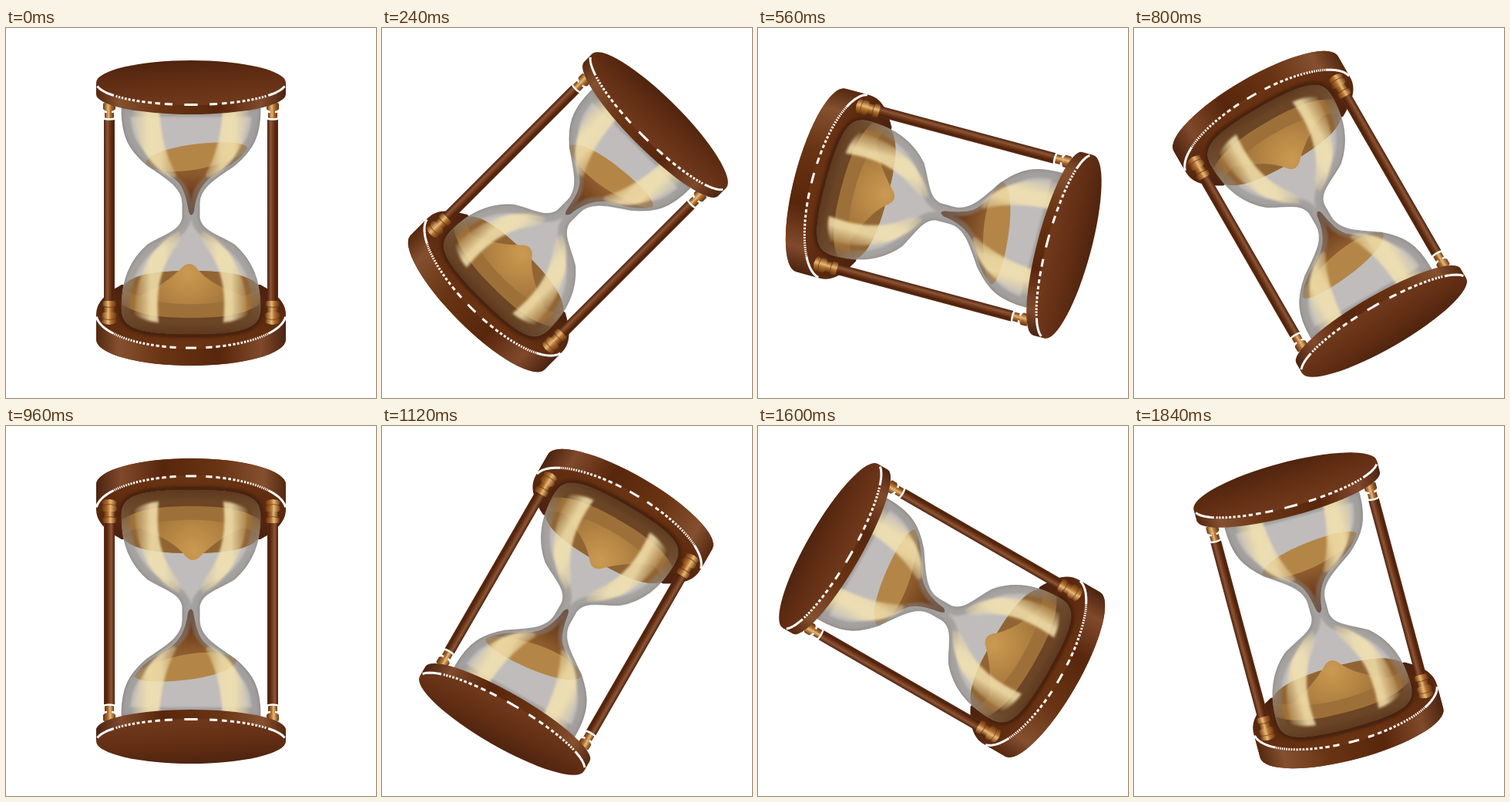
Animation of 480 by 480 pixels, one loop 1.92 s. Source, as an HTML page:

```html
<!DOCTYPE html>
<html lang="en">
<head>
<meta charset="utf-8">
<title>Hourglass</title>
<style>
  html, body { margin: 0; width: 100%; height: 100%; overflow: hidden; background: #fff; }
  svg { display: block; width: 100vw; height: 100vh; }
</style>
</head>
<body>
<svg viewBox="0 0 480 480">
  <defs>
    <linearGradient id="face" x1="0" y1="0" x2=".25" y2="1">
      <stop offset="0" stop-color="#4a210d"/><stop offset=".45" stop-color="#5f2c13"/><stop offset="1" stop-color="#6f381b"/>
    </linearGradient>
    <linearGradient id="rim">
      <stop offset="0" stop-color="#55280f"/><stop offset=".12" stop-color="#84502f"/><stop offset=".35" stop-color="#693413"/>
      <stop offset=".65" stop-color="#58260c"/><stop offset=".87" stop-color="#80492b"/><stop offset="1" stop-color="#4b2310"/>
    </linearGradient>
    <linearGradient id="deck" x1="0" y1="0" x2="0" y2="1">
      <stop offset="0" stop-color="#4a210e"/><stop offset=".5" stop-color="#602c10"/><stop offset="1" stop-color="#733a16"/>
    </linearGradient>
    <linearGradient id="wood">
      <stop offset="0" stop-color="#4b220f"/><stop offset=".32" stop-color="#8d5536"/><stop offset=".55" stop-color="#6f3819"/><stop offset=".8" stop-color="#4f210c"/><stop offset="1" stop-color="#5a2c15"/>
    </linearGradient>
    <linearGradient id="gold">
      <stop offset="0" stop-color="#6b3611"/><stop offset=".42" stop-color="#e8b873"/><stop offset=".62" stop-color="#b06f31"/><stop offset="1" stop-color="#64310f"/>
    </linearGradient>
    <linearGradient id="funnel" x1="0" y1="0" x2="0" y2="1">
      <stop offset="0" stop-color="#a37338"/><stop offset=".4" stop-color="#8a582b"/><stop offset=".75" stop-color="#683617"/><stop offset="1" stop-color="#4e230f"/>
    </linearGradient>
    <radialGradient id="mound" gradientUnits="userSpaceOnUse" cx="236" cy="318" r="65">
      <stop offset="0" stop-color="#cb9a52"/><stop offset=".4" stop-color="#bb8b47"/><stop offset="1" stop-color="#a1733a"/>
    </radialGradient>
    <linearGradient id="shine">
      <stop offset="0" stop-color="#efdda6" stop-opacity=".15"/><stop offset=".35" stop-color="#f5e4b0" stop-opacity=".85"/>
      <stop offset=".65" stop-color="#f5e4b0" stop-opacity=".8"/><stop offset="1" stop-color="#e6d4a4" stop-opacity=".35"/>
    </linearGradient>
    <linearGradient id="edge" gradientUnits="userSpaceOnUse" x1="0" y1="100" x2="0" y2="398">
      <stop offset="0" stop-color="#858280"/><stop offset=".78" stop-color="#8c8986"/><stop offset=".88" stop-color="#75593f"/><stop offset="1" stop-color="#56311a"/>
    </linearGradient>
    <filter id="soft"><feGaussianBlur stdDeviation="1.6"/></filter>
    <path id="glass" d="M150 104C150 142 160 158 183 178C206 194 229 206 229 228V246C226 264 205 268 184 281C163 299 150 325 150 362C150 386 162 397 240 397S330 386 330 362C330 325 317 299 296 281C275 268 254 264 251 246V228C251 206 274 194 297 178C320 158 330 142 330 104Z"/>
    <clipPath id="inside"><use href="#glass"/></clipPath>
    <g id="post">
      <rect x="-7" y="117" width="14" height="242" fill="url(#wood)"/>
      <g fill="url(#gold)">
        <rect x="-8" y="97" width="16" height="10" rx="2"/>
        <rect x="-6" y="107" width="12" height="11"/>
        <rect x="-9" y="354" width="18" height="8" rx="3"/>
        <rect x="-7" y="361" width="14" height="9"/>
        <rect x="-10" y="369" width="20" height="8" rx="4"/>
        <path d="M-8 376H8L10 382Q0 388-10 382Z"/>
      </g>
      <path d="M-8 361Q0 364 8 361M-9 377Q0 380 9 377" fill="none" stroke="#6b3611" stroke-opacity=".7"/>
      <path d="M-9 106Q-7 109-3 109M3 109Q7 109 9 106M-9 113V117Q0 120 9 117V113" fill="none" stroke="#fff" stroke-width="2.4"/>
    </g>
    <g id="shines" fill="url(#shine)">
      <path d="M164 104H199C200 130 206 165 221 190Q221 196 212 193C186 178 167 150 164 104Z"/>
      <path d="M224 264C190 281 167 318 167 372Q182 381 198 382C193 335 203 306 222 282Q230 266 224 264Z"/>
    </g>
  </defs>

  <g id="hourglass">
    <path d="M117 372C117 358 126 346 150 333H330C354 346 363 358 363 372V404A123 34 0 0 1 117 404Z" fill="url(#deck)"/>
    <path d="M117 372A123 44 0 0 0 363 372V404A123 34 0 0 1 117 404Z" fill="url(#rim)"/>
    <path d="M145 360C145 393 166 402 240 402S335 393 335 360Z" fill="#4a2410" filter="url(#soft)"/>

    <use href="#glass" fill="#bfbcbb"/>
    <g clip-path="url(#inside)">
      <path d="M148 346H332V400H148Z" fill="#6b4525"/>
      <path d="M150 337C162 319 196 315 240 315S318 319 330 337V358C310 372 280 376 240 376S170 372 150 358Z" fill="#9e7039"/>
      <path d="M150 337C162 319 196 315 240 315S318 319 330 337C318 349 280 353 240 353S162 349 150 337Z" fill="#916533"/>
      <path d="M174 347C195 339 214 325 230 309Q239 302 247 311C259 327 282 339 306 347C280 362 200 362 174 347Z" fill="url(#mound)"/>

      <path d="M181 173C196 180 208 187 219 196C231 205 234 222 237 238Q240 247 244 238C246 220 252 205 264 195C282 183 305 172 313 155L240 171Z" fill="url(#funnel)"/>
      <path d="M181 177C182 164 212 155 243 151C277 147 307 147 313 155C311 166 284 174 259 181C230 188 195 189 181 177Z" fill="#b38647"/>

      <g fill="none" filter="url(#soft)">
        <use href="#glass" stroke="url(#edge)" stroke-opacity=".5" stroke-width="22"/>
        <use href="#glass" stroke="url(#edge)" stroke-opacity=".35" stroke-width="6"/>
      </g>
      <g filter="url(#soft)">
        <use href="#shines"/>
        <use href="#shines" transform="matrix(-1 0 0 1 480 0)"/>
      </g>
    </g>
    <use href="#glass" fill="none" stroke="url(#edge)" stroke-opacity=".7" stroke-width="1.2"/>

    <use href="#post" x="134"/>
    <use href="#post" x="346"/>

    <path d="M117 71V86A123 26 0 0 0 363 86V71Z" fill="url(#rim)"/>
    <ellipse cx="240" cy="71" rx="123" ry="29" fill="url(#face)"/>
    <g fill="none" stroke="#fff" stroke-width="3">
      <path id="topEdge"/>
      <path id="baseEdge"/>
    </g>
  </g>
</svg>
<script>
  const STEP_MS = 80, STEPS = 24, RADIUS = 123;
  const hourglass = document.getElementById('hourglass');

  // Dashes follow the lower half of an ellipse and shorten towards its ends.
  function dashedEdge(centerY, ry, endRise) {
    const bottom = centerY + ry;
    const solidFrom = ry * 0.42;
    const halfWidth = rise => RADIUS * Math.sqrt(1 - (1 - rise / ry) ** 2);
    const segment = (from, to) => [-1, 1].map(side => {
      const point = rise => `${(240 + side * halfWidth(rise)).toFixed(2)} ${(bottom - rise).toFixed(2)}`;
      return `M${point(from)}L${point((from + to) / 2)}L${point(to)}`;
    }).join('');

    let path = segment(0, 0.07);
    for (let rise = 1; rise < solidFrom; rise++) path += segment(rise - 0.45, rise + 0.12);
    for (let rise = solidFrom; rise < endRise; rise += 2) path += segment(rise, rise + 2);
    return path;
  }

  document.getElementById('topEdge').setAttribute('d', dashedEdge(71, 28.5, 23));
  document.getElementById('baseEdge').setAttribute('d', dashedEdge(371, 44, 40));

  function render(time) {
    const step = Math.floor(time / STEP_MS) % STEPS;
    hourglass.setAttribute('transform', `rotate(${step * 360 / STEPS} 240 240)`);
  }

  function tick() {
    render(performance.now());
    requestAnimationFrame(tick);
  }
  tick();
</script>
</body>
</html>
```
